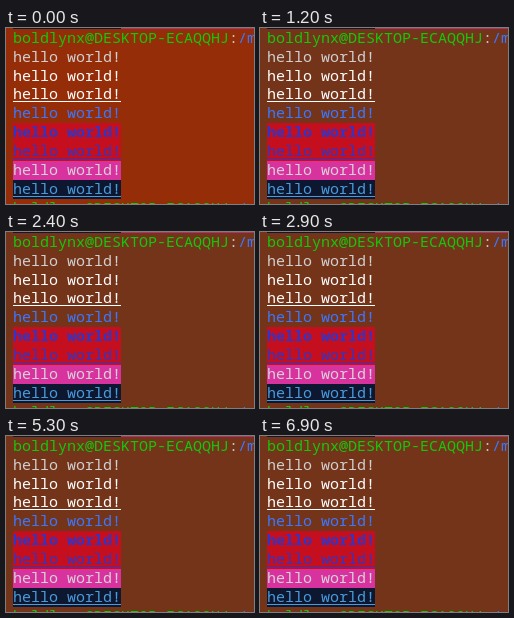
An HTML page with a canvas for the animation above (7200 ms loop, 248x176 px).

```html
<!DOCTYPE html>
<html lang="en">
<head>
<meta charset="utf-8">
<title>Terminal text styles</title>
<style>
html, body { margin: 0; width: 100%; height: 100%; overflow: hidden; background: #74351a; }
canvas { display: block; width: 248px; height: 176px; }
</style>
</head>
<body>
<canvas id="stage" width="248" height="176"></canvas>
<script>
const ctx = document.getElementById('stage').getContext('2d');
const LOOP = 7200, LEFT = 7, CELL = 9, PITCH = 18.9, TOP = 0.7;
const FONT = '15px "Noto Sans Mono", "DejaVu Sans Mono", monospace';
const GREEN = '#16c60c', BLUE = '#3b78ff', NAVY = '#0d1730';

// Background fade: [time, r, g, b]
const fade = [
  [0, 148, 45, 8],
  [300, 133, 53, 20],
  [600, 124, 53, 24],
  [1200, 116, 52, 26],
  [LOOP, 116, 52, 26]
];

// Times during which the blinking line is dimmed
const dimSpans = [[1300, 2400], [3500, 4500], [5700, 6700]];

const lines = [
  { color: '#d0d0d0' },
  { color: '#ffffff' },
  { color: '#ffffff', underline: true },
  { color: BLUE },
  { color: '#3434c4', fill: '#c50f1f', bold: true },
  { color: '#3434c4', fill: '#c50f1f', underline: true },
  { color: '#d8d2d8', fill: '#d8329f' },
  { color: '#4a9bdc', dim: '#234c70', fill: NAVY, underline: true }
];

const rowTop = row => Math.round(TOP + row * PITCH);

function background(t) {
  const i = fade.findIndex((k, n) => n > 0 && t <= k[0]);
  const a = fade[i - 1], b = fade[i];
  const p = (t - a[0]) / (b[0] - a[0]);
  const rgb = [1, 2, 3].map(c => Math.round(a[c] + (b[c] - a[c]) * p));
  return `rgb(${rgb})`;
}

function write(text, col, row, color, bold) {
  ctx.font = `${bold ? 600 : 500} ${FONT}`;
  ctx.fillStyle = color;
  ctx.fillText(text, LEFT + col * CELL, rowTop(row) + 14);
}

function prompt(row) {
  write('boldlynx@DESKTOP-ECAQQHJ', 0, row, GREEN);
  write(':', 24, row, '#d0d0d0');
  write('/m', 25, row, BLUE);
}

function hello(line, row, dimmed) {
  const y = rowTop(row), width = 12 * CELL;
  const color = dimmed && line.dim || line.color;
  if (line.fill) {
    ctx.fillStyle = line.fill;
    ctx.fillRect(LEFT, y, width, rowTop(row + 1) - y);
  }
  write('hello world!', 0, row, color, line.bold);
  if (line.underline) ctx.fillRect(LEFT, y + 16, width, 1);
}

function draw(t) {
  const dimmed = dimSpans.some(([from, to]) => t >= from && t < to);
  ctx.fillStyle = background(t);
  ctx.fillRect(0, 0, 248, 176);
  // Lower edge of the line scrolled off the top
  const edge = LEFT + 12 * CELL;
  ctx.fillStyle = NAVY;
  ctx.fillRect(LEFT, 0, edge - LEFT, 1);
  ctx.fillStyle = '#a83468';
  ctx.fillRect(edge, 0, 248 - edge, 1);
  prompt(0);
  lines.forEach((line, i) => hello(line, i + 1, dimmed));
  prompt(lines.length + 1);
}

function tick() {
  const t = performance.now() % LOOP;
  draw(Math.floor(t / 100) * 100);
  requestAnimationFrame(tick);
}
tick();
</script>
</body>
</html>
```
